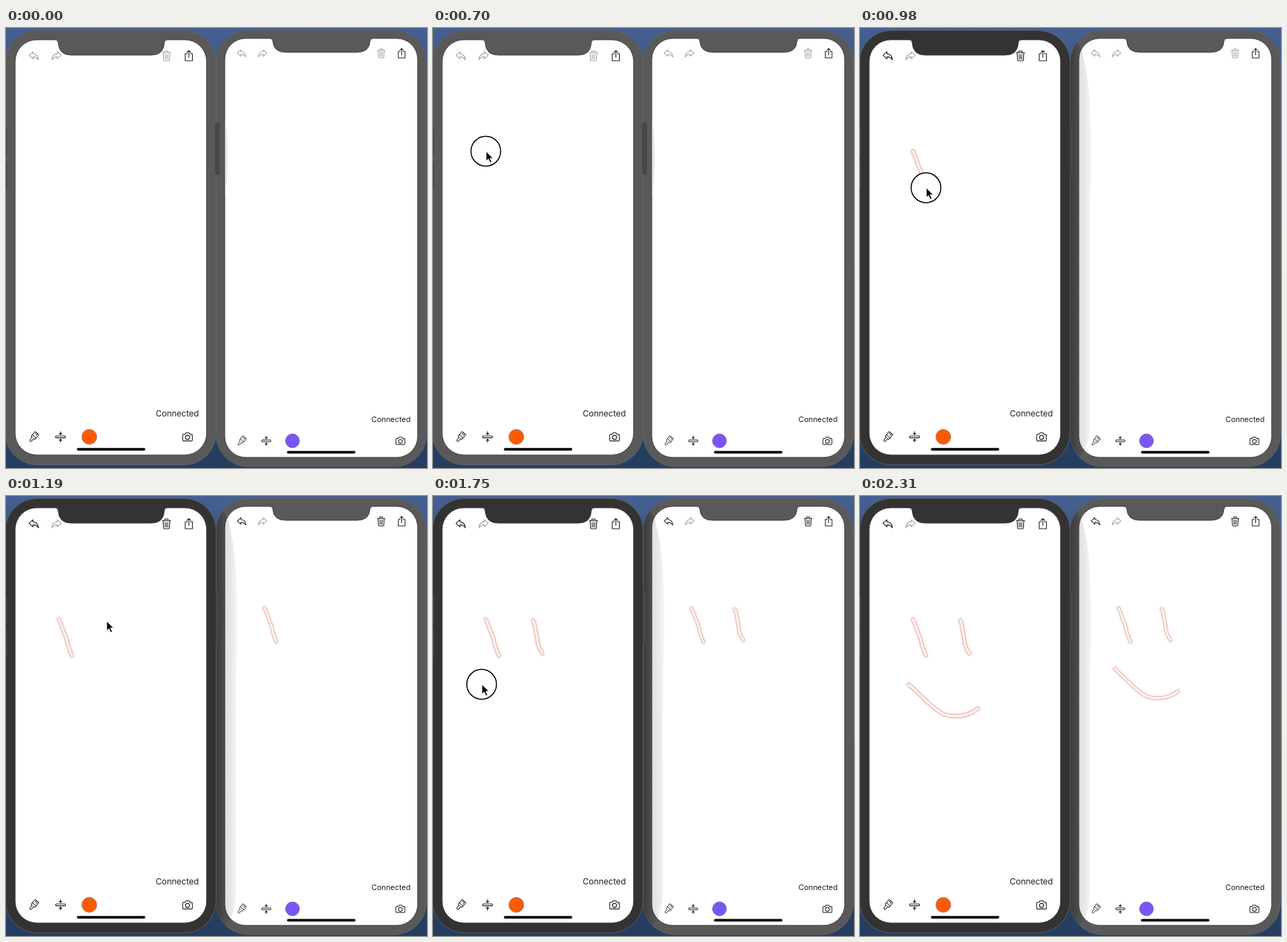
These frames come from a looping animation (606 by 632 pixels, 2.52 s). An HTML page:

```html
<!DOCTYPE html>
<html lang="en">
<head>
<meta charset="utf-8">
<title>Shared drawing</title>
<style>
  html, body { margin: 0; width: 100%; height: 100%; overflow: hidden; background: #34496d; }
  svg { display: block; width: 100vw; height: 100vh; }
  text { font-family: Inter, Roboto, sans-serif; fill: #1c1c1c; text-anchor: middle; }
  .icon { fill: none; stroke: #1c1c1c; stroke-width: 1.1; stroke-linejoin: round; stroke-linecap: round; }
  .off { stroke: #a2a2a2; }
  .ink path { fill: none; stroke-linecap: round; stroke-linejoin: round; }
</style>
</head>
<body>
<svg viewBox="0 0 606 632">
  <defs>
    <linearGradient id="desk" x2="0" y2="1">
      <stop stop-color="#456092"/><stop offset=".12" stop-color="#3d5580"/>
      <stop offset=".5" stop-color="#33435f"/><stop offset="1" stop-color="#253e60"/>
    </linearGradient>
    <linearGradient id="shade" gradientUnits="userSpaceOnUse" x1="302" x2="334">
      <stop stop-color="#000" stop-opacity=".36"/><stop offset=".4" stop-color="#000" stop-opacity=".13"/>
      <stop offset=".85" stop-color="#000" stop-opacity=".06"/><stop offset="1" stop-color="#000" stop-opacity=".02"/>
    </linearGradient>
    <clipPath id="case"><rect x="302.5" y="3.5" width="302.7" height="626.5" rx="46"/></clipPath>
    <filter id="soft" filterUnits="userSpaceOnUse" x="0" y="0" width="606" height="632">
      <feGaussianBlur stdDeviation="1"/>
    </filter>
    <path id="undo" d="M-6.6-.8L-1-5.9V-2.9C4-2.7 6.4.6 6.8 5.8 5 2.7 3 1.4-1 1.4V4.4Z"/>
    <g id="trash">
      <path d="M-6-4.7H6M-2.2-4.9V-7H2.2V-4.9M-4.8-4.5L-4.2 5.6Q-4.1 7-2.8 7H2.8Q4.1 7 4.2 5.6L4.8-4.5"/>
      <path d="M-2.1-2.2L-1.8 4.6M0-2.2V4.6M2.1-2.2L1.8 4.6" stroke-width=".9"/>
    </g>
    <path id="share" d="M-2.3-3H-5.2V7H5.2V-3H2.3M0 2.2V-7.6M-2.8-4.9L0-7.7 2.8-4.9"/>
    <g id="brush" transform="rotate(40)">
      <path d="M-4-8.2H4V1.2Q4 2.2 3 2.2H1.6V7.6Q1.6 9.2 0 9.2T-1.6 7.6V2.2H-3Q-4 2.2-4 1.2ZM-4-1.2H4M-1.3-8V-5M1.4-8V-4.4"/>
    </g>
    <path id="width" d="M-6-1.3H6Q7.2-1.3 7.2 0T6 1.3H-6Q-7.2 1.3-7.2 0T-6-1.3ZM0-7.4V-3.4M-1.9-5.2L0-3.3 1.9-5.2M0 7.4V3.4M-1.9 5.2L0 3.3 1.9 5.2"/>
    <g id="camera">
      <path d="M-5.8-3.8H-3.4L-2.2-5.8H2.2L3.4-3.8H5.8Q7-3.8 7-2.6V4.6Q7 5.8 5.8 5.8H-5.8Q-7 5.8-7 4.6V-2.6Q-7-3.8-5.8-3.8Z"/>
      <circle cy=".8" r="3"/><path d="M4.7-1.8H5"/>
    </g>
  </defs>

  <rect width="606" height="632" fill="url(#desk)"/>
  <g id="phones"></g>
  <g class="ink" id="copy" transform="translate(302.55 -3.6) scale(.915 .93)"></g>
  <g class="ink" id="ink"></g>
  <g id="touch"><circle r="21.4" fill="#fff" stroke="#000" stroke-width="1.5"/></g>
  <g id="arrow"><path d="M.5.3V13.9L3.7 11 6.2 16.6 8.500 15.6 6 10.1H10.300Z" fill="#000" stroke="#fff" stroke-width=".8"/></g>
</svg>
<script>
const STEP = 70, LOOP = 2520, FOCUS = 770, SYNC = 1050, LEAVE = 2310;
const $ = id => document.getElementById(id);

// Screen outline with the notch cut from its top edge.
function screen(x, y, r, b, n1, n2, ny, rad) {
  return `M${x + rad} ${y}H${n1 - 4}Q${n1} ${y} ${n1} ${y + 4}Q${n1 + 1} ${ny} ${n1 + 19} ${ny}` +
    `H${n2 - 19}Q${n2 - 1} ${ny} ${n2} ${y + 4}Q${n2} ${y} ${n2 + 4} ${y}H${r - rad}` +
    `A${rad} ${rad} 0 0 1 ${r} ${y + rad}V${b - rad}A${rad} ${rad} 0 0 1 ${r - rad} ${b}` +
    `H${x + rad}A${rad} ${rad} 0 0 1 ${x} ${b - rad}V${y + rad}A${rad} ${rad} 0 0 1 ${x + rad} ${y}Z`;
}

function icon(name, x, y, k = 1, cls = '', flip = 1) {
  return `<g class="icon ${cls}" transform="translate(${x} ${y}) scale(${k * flip} ${k})"><use href="#${name}"/></g>`;
}

function phone(p) {
  const [undo, redo, trash, share] = p.top, [brush, width, dot, camera] = p.low;
  const k = p.scale, b = p.body;
  return `<rect class="${p.id}-body" x="${b[0]}" y="${b[1]}" width="${b[2]}" height="${b[3]}" rx="46" fill="#595959" stroke="#696969" stroke-width=".8"/>
    <path d="${screen(...p.screen)}" fill="#fff" stroke="#333" stroke-width=".8"/>` +
    icon('undo', undo, p.topY, k, 'off ' + p.id) + icon('undo', redo, p.topY, k, 'off', -1) +
    icon('trash', trash, p.topY, k, 'off ' + p.id) + icon('share', share, p.topY, k) +
    icon('brush', brush, p.lowY, k * .88) + icon('width', width, p.lowY, k) + icon('camera', camera, p.lowY, k) +
    `<circle cx="${dot}" cy="${p.lowY}" r="${10.8 * k}" fill="${p.color}" stroke="${p.ring}" stroke-width="1"/>
    <rect x="${p.bar}" y="${p.barY}" width="98.5" height="3.6" rx="1.8"/>
    <text x="${p.text[0]}" y="${p.text[1]}" font-size="${p.text[2]}">Connected</text>`;
}

const left = {
  id: 'left', body: [-1, 3.5, 303.5, 624], screen: [13.2, 17, 288.7, 613.2, 75, 228, 39, 31], scale: 1,
  top: [39.8, 72.8, 231, 263.2], topY: 40, low: [40, 78.5, 119.9, 261.3], lowY: 587.3,
  color: '#fd5a02', ring: '#a98b86', bar: 102, barY: 603.3, text: [246.5, 558, 12]
};
const right = {
  id: 'right', body: [302.5, 3.5, 302.7, 626.5], screen: [315, 15, 592.5, 616.7, 384, 524, 35, 30], scale: .92,
  top: [339, 369.4, 540, 569.5], topY: 36.5, low: [339.3, 374.6, 412.4, 567.7], lowY: 593,
  color: '#7a56fa', ring: '#7468a4', bar: 404.5, barY: 607.6, text: [554.2, 566.3, 10.9]
};

$('phones').innerHTML = phone(right) +
  `<g clip-path="url(#case)"><path id="shadow" fill="url(#shade)" d="M302 45V0L318 30Q328 60 331 110T332 235Q330 300 331 420V570Q331 600 316 616L302 632Z"/></g>
  <path id="hint" d="M315.5 130Q319 150 319 185T315.5 240Z" fill="#e6e6e6"/>` +
  phone(left) +
  `<rect x="301.8" y="136" width="5.4" height="74" rx="1.5" fill="#484848" stroke="#3c3c3c" stroke-width=".7"/>
  <path d="M.8 145V182M.8 192V231" stroke="#454545" stroke-width="1.4"/>`;

const strokes = [
  { from: 700, to: 980, down: 630, ease: 1.25, sync: SYNC,
    d: 'M76 177C78.500 182 81 189 83.500 196S87 202 88 209 92 222 95 229.500' },
  { from: 1260, to: 1470, down: 1260, ease: 1.2, sync: 1610,
    d: 'M144 178.500C147.500 184 146.500 190 148.500 197S149.500 207 151.500 214 155 221 157.500 226.500' },
  { from: 1750, to: 2100, down: 1750, ease: 1.4, sync: 2240,
    d: 'M70 270.500C81 280 87 286.500 95 294S112 310 121 313.500 143 317 153 314 163 310 170 305' }
];
const layers = [['#f0a090', 7.2, .26], ['#c67d6e', 4.5, .56], ['#fff', 2.5, 1]];

function ink(parent, d) {
  const g = document.createElementNS('http://www.w3.org/2000/svg', 'g');
  g.innerHTML = layers.map(([color, w, alpha], i) =>
    `<path d="${d}" stroke="${color}" stroke-width="${w}" opacity="${alpha}"${i < 2 ? ' filter="url(#soft)"' : ''}/>`).join('');
  parent.append(g);
  return g;
}
for (const s of strokes) {
  s.line = ink($('ink'), s.d);
  s.copy = ink($('copy'), s.d);
  s.path = s.line.lastChild;
  s.len = s.path.getTotalLength();
}

// Pointer travel between strokes: time, x, y.
const moves = [
  [70, 410, 582], [210, 262, 385], [350, 136, 228], [490, 82, 180], [560, 76, 177], [700, 76, 177],
  [980, 95, 229.5], [1050, 108, 222], [1120, 132, 196], [1190, 144.500, 179.5], [1260, 144, 178.5],
  [1470, 157.5, 226.5], [1540, 155.5, 236], [1610, 121, 252], [1680, 84, 266], [1750, 70, 270],
  [2100, 170, 305], [2170, 224, 418], [2240, 296.5, 595.5], [LEAVE, 330, 660]
];

function travel(t) {
  const i = Math.max(1, moves.findIndex(m => m[0] >= t));
  const [a, b] = [moves[i - 1], moves[i]], f = (t - a[0]) / (b[0] - a[0]);
  return { x: a[1] + (b[1] - a[1]) * f, y: a[2] + (b[2] - a[2]) * f };
}

const show = (el, on) => { el.style.display = on ? '' : 'none'; };
const dim = (name, off) => document.querySelectorAll('.icon.' + name).forEach(el => el.classList.toggle('off', off));

function draw(time) {
  const t = Math.min(LEAVE, Math.floor((time % LOOP) / STEP) * STEP);
  const focused = t >= FOCUS;
  const body = document.querySelector('.left-body');
  body.setAttribute('fill', focused ? '#333' : '#595959');
  body.setAttribute('stroke', focused ? '#666' : '#696969');
  show($('shadow'), focused);
  show($('hint'), !focused);
  dim('left', !focused);
  dim('right', t < SYNC);

  const visible = t >= STEP && t < LEAVE;
  let pos = visible ? travel(t) : { x: 0, y: 0 }, pressed = false;
  for (const s of strokes) {
    const f = Math.min(1, Math.max(0, (t - s.from) / (s.to - s.from))) ** s.ease;
    show(s.line, t > s.from);
    show(s.copy, t >= s.sync);
    for (const p of s.line.children) p.style.strokeDasharray = f < 1 ? `${s.len * f} 999` : 'none';
    if (t >= s.down && t <= s.to) {
      pressed = true;
      pos = s.path.getPointAtLength(s.len * f);
    }
  }
  const at = `translate(${pos.x} ${pos.y})`;
  $('touch').setAttribute('transform', at);
  $('arrow').setAttribute('transform', at);
  show($('touch'), pressed);
  show($('arrow'), visible);
}

const start = performance.now();
function tick() {
  draw(performance.now() - start);
  requestAnimationFrame(tick);
}
tick();
</script>
</body>
</html>
```
